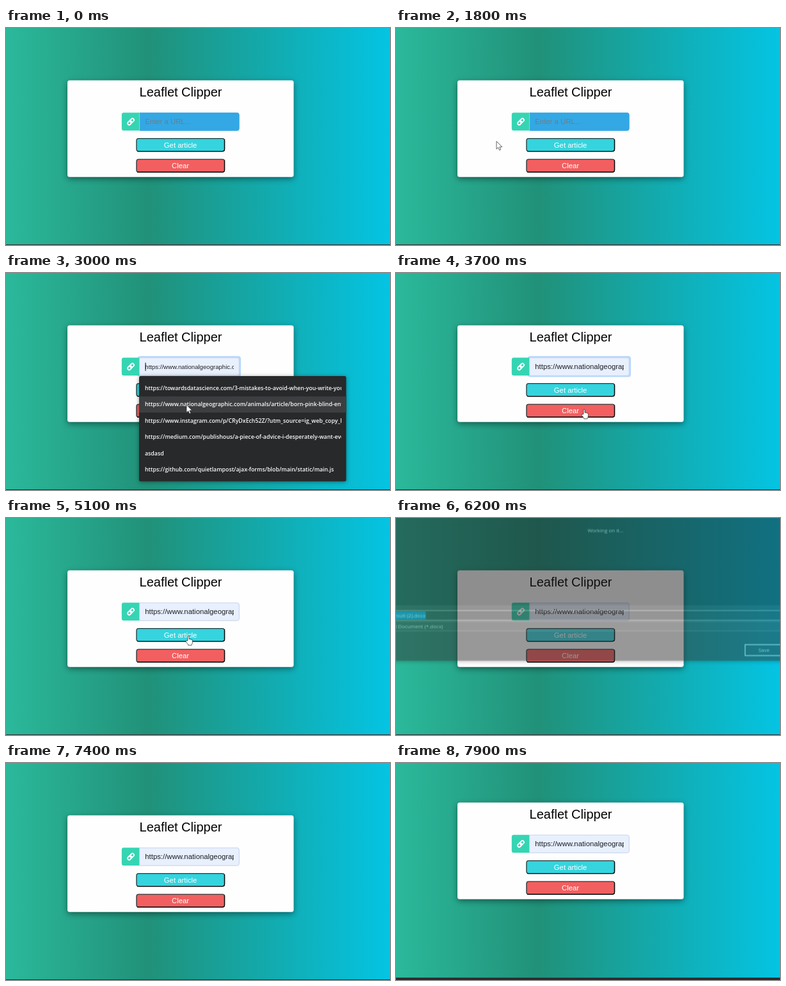
An HTML page for the animation above (8 s loop, 600x339 px).

```html
<!DOCTYPE html>
<html lang="en">
<head>
<meta charset="utf-8">
<title>Leaflet Clipper</title>
<style>
html, body { margin: 0; width: 100%; height: 100%; overflow: hidden; background: #21937b; }
svg { display: block; width: 600px; height: 339px; }
text { font-family: "Liberation Sans", Arial, sans-serif; font-size: 11.33px; white-space: pre; }
.mid { text-anchor: middle; }
.end { text-anchor: end; }
.menu text { font: 600 8.78px "Open Sans", "Noto Sans", sans-serif; fill: #fafafa; }
.dialog text { font: 8.2px "Open Sans", "Noto Sans", sans-serif; fill: #e4e4e4; }
.dialog .name { font-size: 8.4px; }
.dialog .dim { fill: #cacaca; }
.preview { font-size: 9.6px; }
.card { filter: drop-shadow(0 3px 5px rgba(0, 0, 0, .42)); }
.menu { filter: drop-shadow(0 1px 3px rgba(0, 0, 0, .4)); }
.panel { filter: drop-shadow(0 1px 3px rgba(0, 0, 0, .5)); }

/* everything shares one 8 s clock */
.anim { animation: 8s linear infinite; }
.step { animation-timing-function: step-end; }

.page { animation-name: lift; }
@keyframes lift { 0% { transform: none } 96.25%, 100% { transform: translateY(-20px) } }
.shelf { animation-name: shelf; }
@keyframes shelf { 0% { opacity: 0 } 96.25%, 100% { opacity: 1 } }

.blue { animation-name: blue; }
@keyframes blue { 0% { opacity: 1 } 28.75%, 100% { opacity: 0 } }
.hint { animation-name: hint; }
@keyframes hint { 0% { opacity: 1 } 31.25%, 100% { opacity: 0 } }
.filled { animation-name: filled; }
@keyframes filled { 0% { opacity: 0 } 31.25%, 100% { opacity: 1 } }
.ring { animation-name: ring; }
@keyframes ring { 0% { opacity: 0 } 28.75% { opacity: 1 } 63.75%, 100% { opacity: 0 } }
.caret { animation-name: caret; }
@keyframes caret { 0% { opacity: 0 } 28.75% { opacity: 1 } 38.75%, 100% { opacity: 0 } }
.pick1 { animation-name: pick1; }
@keyframes pick1 { 0% { opacity: 0 } 31.25% { opacity: 1 } 35%, 100% { opacity: 0 } }
.pick2 { animation-name: pick2; }
@keyframes pick2 { 0% { opacity: 0 } 35% { opacity: 1 } 38.75%, 100% { opacity: 0 } }
.value { animation-name: value; }
@keyframes value { 0% { opacity: 0 } 38.75%, 100% { opacity: 1 } }
.menu { animation-name: menu; }
@keyframes menu { 0% { opacity: 0 } 30% { opacity: 1 } 38.75%, 100% { opacity: 0 } }

.dialog { transform-origin: 250px 64px; animation-name: dialog; }
@keyframes dialog {
  0%, 76.25% { opacity: 0; transform: scale(.952) }
  78.75%, 90% { opacity: 1; transform: none }
  92.5%, 100% { opacity: 0; transform: scale(.952) }
}
.busy { animation-name: busy; }
@keyframes busy { 0% { opacity: 1 } 81.25%, 100% { opacity: 0 } }
.files { animation-name: files; }
@keyframes files { 0% { opacity: 0 } 81.25%, 100% { opacity: 1 } }

.pointer { animation-name: pointer; animation-timing-function: ease-in-out; }
@keyframes pointer {
  0%, 16.25% { transform: translate(-20px, 240px) }
  21.25%, 23.75% { transform: translate(157px, 177px) }
  28.125%, 29.375% { transform: translate(250px, 148px) }
  31.875%, 33.125% { transform: translate(276px, 185px) }
  35.625%, 37.5% { transform: translate(282px, 206px) }
  45%, 48.75% { transform: translate(294px, 213px) }
  55%, 63.75% { transform: translate(285px, 184px) }
  71.25% { transform: translate(612px, 205px) }
  80% { transform: translate(614px, 230px) }
  84.375%, 89.375% { transform: translate(571.5px, 216.5px) }
  93.125%, 100% { transform: translate(614px, 240px) }
}
.arrow { animation-name: arrow; }
@keyframes arrow { 0% { opacity: 1 } 43.75% { opacity: 0 } 65%, 100% { opacity: 1 } }
.hand { animation-name: hand; }
@keyframes hand { 0% { opacity: 0 } 43.75% { opacity: 1 } 65%, 100% { opacity: 0 } }
</style>
</head>
<body>
<svg viewBox="0 0 600 339">
  <defs>
    <linearGradient id="sky">
      <stop offset="0" stop-color="#2bb99b"/>
      <stop offset=".37" stop-color="#219179"/>
      <stop offset="1" stop-color="#04c4e3"/>
    </linearGradient>
    <clipPath id="field"><rect x="216" y="132" width="139.5" height="29"/></clipPath>
    <clipPath id="list"><rect x="216" y="161" width="307.5" height="165"/></clipPath>
    <path id="box" d="M208.8 132.6h152.4a3 3 0 0 1 3 3v21.6a3 3 0 0 1-3 3H208.8z" stroke-width=".8"/>
  </defs>

  <rect width="600" height="339" fill="url(#sky)"/>

  <g class="page anim step">
    <rect class="card" x="96" y="81.7" width="353.5" height="151" rx="3.5" fill="#fffeff"/>
    <text class="mid" x="273" y="107.3" style="font-size:20px">Leaflet Clipper</text>

    <rect class="ring anim step" x="205.7" y="129.8" width="161.3" height="32.6" rx="4" fill="#b9d8fb"/>
    <path d="M208.5 132.3H184a3.2 3.2 0 0 0-3.2 3.2v21.6a3.2 3.2 0 0 0 3.2 3.2h24.5z" fill="#35d5b3"/>
    <g transform="translate(195 146.3) rotate(-45)" fill="none" stroke="#fff" stroke-width="1.9">
      <rect x="-6" y="-2.4" width="6.9" height="4.8" rx="2.4"/>
      <rect x="-.9" y="-2.4" width="6.9" height="4.8" rx="2.4"/>
    </g>
    <use href="#box" fill="#fff" stroke="#c9d6e6"/>
    <use href="#box" class="filled anim step" fill="#e8f0fe" stroke="#c3d2e4"/>
    <use href="#box" class="blue anim step" fill="#33a8e5" stroke="#33a8e5"/>
    <path d="M208.6 132.5v27.6" stroke="#a9dfe3" stroke-width=".7"/>
    <g clip-path="url(#field)">
      <text class="hint anim step" x="217.3" y="150.3" fill="#6c7d88">Enter a URL...</text>
      <text class="preview pick1 anim step" x="217.3" y="149.8" fill="#222">https://towardsdatascience.com/3-mistakes</text>
      <text class="preview pick2 anim step" x="217.3" y="149.8" fill="#222">https://www.nationalgeographic.com/animals</text>
      <text class="value anim step" x="217.3" y="150.3" fill="#1c1f24">https://www.nationalgeographic.com/</text>
      <path class="caret anim step" d="M218 140v13" stroke="#111"/>
    </g>

    <g stroke="#26383a" stroke-width="1.3">
      <rect x="203.9" y="172.6" width="137.6" height="20" rx="3.4" fill="#35d4de"/>
      <rect x="203.9" y="205.1" width="137.6" height="20" rx="3.4" fill="#f25f60"/>
    </g>
    <path d="M205 192.6h133.1a3.4 3.4 0 0 0 3.4-3.4V174M205 225.1h133.1a3.4 3.4 0 0 0 3.4-3.4V206.5" fill="none" stroke="#080808" stroke-width="1.3"/>
    <text class="mid" x="272.6" y="186.5" fill="#fff">Get article</text>
    <text class="mid" x="272.6" y="219.1" fill="#fff">Clear</text>
  </g>

  <g class="menu anim step">
    <rect x="208" y="161" width="323.5" height="164.6" rx="2.5" fill="#28292b"/>
    <rect class="pick1 anim step" x="208" y="167.3" width="323.5" height="25.4" fill="#3d3e40"/>
    <rect class="pick2 anim step" x="208" y="192.7" width="323.5" height="25.4" fill="#3d3e40"/>
    <g clip-path="url(#list)">
      <text x="217" y="183">https://towardsdatascience.com/3-mistakes-to-avoid-when-you-write-your-code</text>
      <text x="217" y="208.4">https://www.nationalgeographic.com/animals/article/born-pink-blind-entirely</text>
      <text x="217" y="233.8">https://www.instagram.com/p/CRyDxEch52Z/?utm_source=ig_web_copy_link</text>
      <text x="217" y="259.2">https://medium.com/publishous/a-piece-of-advice-i-desperately-want-every</text>
      <text x="217" y="284.6">asdasd</text>
      <text x="217" y="310">https://github.com/quietlampost/ajax-forms/blob/main/static/main.js</text>
    </g>
  </g>

  <rect y="338" width="600" height="1" fill="#383036"/>
  <g class="shelf anim step">
    <rect y="335" width="600" height="4" fill="#2b2a2e"/>
    <rect y="335" width="600" height="1" fill="#454a4f"/>
  </g>

  <g class="dialog anim">
    <g class="panel">
      <rect x="-60" y="-60" width="760" height="200" fill="#1f1e20"/>
      <rect x="-60" y="138" width="760" height="88.8" fill="#333"/>
    </g>
    <text class="busy anim step" x="300.5" y="21">Working on it...</text>
    <g class="files anim step">
      <path d="M168.5 0v5M291.5 0v5M381.5 0v5M451.5 0v5" stroke="#303032"/>
      <g id="rows"></g>
    </g>
    <g fill="#2e2e2e">
      <rect x="-60" y="146.5" width="760" height="15.5" stroke="#a5a5a5"/>
      <rect x="-60" y="164" width="760" height="15" fill="#383838" stroke="#686868"/>
    </g>
    <rect x="-60" y="148" width="101.5" height="12.5" fill="#0f78c8"/>
    <text class="end" x="41" y="157.3">web_scraper_result (2).docx</text>
    <text class="end" x="69" y="174.8">Word Document (*.docx)</text>
    <rect x="552.5" y="201" width="62" height="17.5" fill="#333" stroke="#f4f4f4" stroke-width="1.3"/>
    <text class="mid" x="582.8" y="212.9">Save</text>
  </g>

  <g class="pointer anim">
    <path class="arrow anim step" d="M0 0v12.2l2.8-2.6 1.8 4.2 2.1-.9-1.8-4.1h3.9z" fill="#fff" stroke="#222" stroke-width=".7" stroke-linejoin="round"/>
    <path class="hand anim step" d="M-1.1 7.5V1a1.1 1.1 0 0 1 2.2 0v4.2q1.1-.7 1.9.3 1.2-.5 1.8.5 1.6-.2 1.6 1.3v3q0 2-1.3 3.2v1.3H-.4v-1.2L-3.9 9.3q-.6-1.7.9-1.6z" fill="#fff" stroke="#222" stroke-width=".7" stroke-linejoin="round"/>
  </g>
</svg>
<script>
const kind = "Norvallen Page Doc...";
// baseline, right edge of name, name, date, type, size
const rows = [
  [16.8, 10, "Today (2)"],
  [34.3, 88, "web_scraper_result (1).docx", "17-11-2021 22:21", kind, "40 KB"],
  [49.6, 77, "web_scraper_result.docx", "17-11-2021 22:20", kind, "40 KB"],
  [67.8, 23, "Last week (2)"],
  [85.4, 102, "INVESTIGATORY PHYSICS.docx", "10-11-2021 11:26", kind, "1,847 KB"],
  [100.8, 58, "kannada_questions", "10-11-2021 21:10", "File folder", ""],
  [118.2, 48, "Earlier this year (10)"],
  [136.2, 42, "sem-1 s10.docx", "03-08-2021 00:24", kind, "27 KB"]
];
const cell = (x, y, text, cls) => `<text x="${x}" y="${y}" class="${cls}">${text}</text>`;
const rule = (x, y) => `<path d="M${x} ${y}H600" stroke="#303032"/>`;
document.getElementById("rows").innerHTML = rows.map(([y, right, name, date, type, size]) =>
  cell(right, y, name, "end name") + (date
    ? cell(181, y, date, "dim") + cell(296, y, type, "dim") + cell(445.5, y, size, "dim end")
    : rule(right + 5, Math.floor(y - 3) + .5))
).join("");
</script>
</body>
</html>
```
